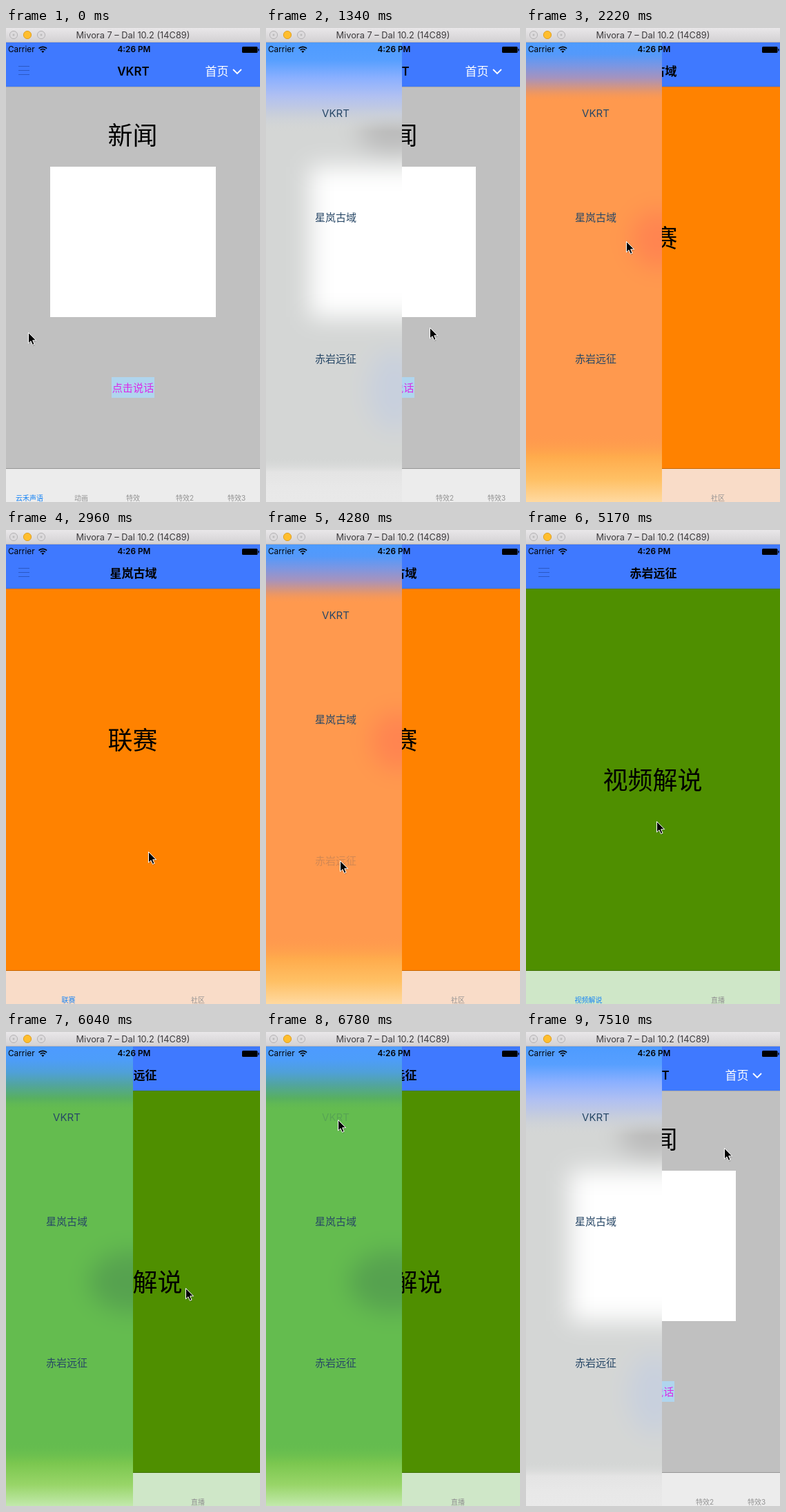
These frames come from a looping animation (368 px wide and 687 px high, 8 s). An HTML page:

```html
<!DOCTYPE html>
<html lang="zh-CN">
<head>
<meta charset="utf-8">
<title>Drawer menu</title>
<style>
html, body { margin: 0; width: 100%; height: 100%; overflow: hidden; }
svg { display: block; width: 100%; height: 100%; }
text { font-family: Inter, "Noto Sans CJK SC", "Noto Sans CJK", sans-serif; white-space: pre; }
</style>
</head>
<body>
<svg id="stage" viewBox="0 0 368 687" xmlns="http://www.w3.org/2000/svg"></svg>
<script>
const LOOP = 8000, STEP = 147.2, LAST = 51, OPEN = 197;
const NAV = '#3f79ff', TINT = '#1583f5', SKY = '#4d9bff';

const games = ['VKRT', '星岚古域', '赤岩远征'];
const itemY = [129, 280, 485];

// sky and foot are the colours of the frosted panel's fades, top to bottom
const scenes = [
  {
    bg: '#c0c0c0', bar: '#ececec', head: '新闻', headY: 169,
    tabs: ['云禾声语', '动画', '特效', '特效2', '特效3'], tabX: [34, 109, 184, 259, 334],
    glass: '#d4d6d5', shade: '#bababa', spot: [184, 152, 50, 28],
    sky: [SKY, '#579fff', '#8bb0ff', '#b0c0f2', '#c8cedb'], skyEnd: 150,
    foot: ['#e4e4e4', '#e8e8e8', '#e9e9e9'], footTop: 622
  },
  {
    bg: '#ff8200', bar: '#f9dcc8', head: '联赛', headY: 318,
    tabs: ['联赛', '社区'], tabX: [90.5, 278],
    glass: '#ff994e', shade: '#ff8450', spot: [192, 306, 40, 42],
    sky: [SKY, '#5499fa', '#7c96e2', '#a693bd', '#e09672'], skyEnd: 107,
    foot: ['#ffab4c', '#ffc064', '#ffd9a0'], footTop: 588
  },
  {
    bg: '#4f8f00', bar: '#cfe7c8', head: '视频解说', headY: 376,
    tabs: ['视频解说', '直播'], tabX: [90.5, 278],
    glass: '#64bc4f', shade: '#56a24f', spot: [184, 362, 64, 44],
    sky: [SKY, '#4d9dfa', '#4fa0d8', '#52a59c', '#58b060'], skyEnd: 115,
    foot: ['#7bc74f', '#98d568', '#c2e9ac'], footTop: 594
  }
];

// [step, x, y]
const pointerKeys = [
  [0, 32, 441], [2, 12, 437], [3, 14, 436], [8, 236, 434], [9, 237, 434],
  [12, 110, 281], [14, 104, 276], [17, 262, 405], [18, 258, 440], [20, 206, 466],
  [22, 14, 458], [23, 16, 455], [26, 250, 436], [28.5, 107, 479], [30, 107, 479],
  [33, 264, 440], [35, 189, 422], [37, 14, 402], [41, 260, 371],
  [45, 104, 128], [48, 104, 126], [51, 287, 168]
];
// [step, width]
const drawerKeys = [
  [0, 0], [3, 0], [8, OPEN], [17, OPEN], [19.5, 0], [23, 0], [27, OPEN],
  [32, OPEN], [34.5, 0], [37, 0], [41, 184], [42, OPEN], [LAST, OPEN]
];
// [first step, scene]
const sceneKeys = [[0, 0], [14, 1], [30, 2], [47, 0]];
// step at which a menu item is pressed: item index
const pressed = { 13: 1, 29: 2, 46: 0 };

const rect = (x, y, w, h, fill, more = '') =>
  `<rect x="${x}" y="${y}" width="${w}" height="${h}" fill="${fill}" ${more}/>`;
const label = (s, x, y, size, fill = '#000', more = '') =>
  `<text x="${x}" y="${y}" font-size="${size}" fill="${fill}" ${more}>${s}</text>`;
const mid = (s, x, y, size, fill, more = '') =>
  label(s, x, y, size, fill, `text-anchor="middle" ${more}`);
const stroke = (d, color, width, more = '') =>
  `<path d="${d}" fill="none" stroke="${color}" stroke-width="${width}" ${more}/>`;
const hairline = (y, alpha) => rect(0, y, 368, 1, '#000', `opacity="${alpha}"`);

// Vertical gradient of evenly spaced colours; `clear` lists a fully transparent one.
const fade = (id, colors, clear) =>
  `<linearGradient id="${id}" x2="0" y2="1">${colors.map((c, k) =>
    `<stop offset="${k / (colors.length - 1)}" stop-color="${c}" stop-opacity="${c === clear ? 0 : 1}"/>`
  ).join('')}</linearGradient>`;

const newsExtras = () =>
  rect(64, 201, 240, 218, '#fff') +
  rect(153, 506, 62, 30, '#b0d5ee') +
  mid('点击说话', 184, 526.5, 15.2, '#d92be8') +
  label('首页', 288.5, 69, 17, '#fff') +
  stroke('M329 60l6 6 6-6', '#fff', 1.8);

const page = (s, i) => `<g class="page">
  ${rect(0, 21, 368, 64, NAV)}
  ${rect(0, 85, 368, 554, s.bg)}
  ${hairline(85, 0.12)}
  ${hairline(638, 0.22)}
  ${rect(0, 639, 368, 48, s.bar)}
  ${stroke('M18 55.5h16M18 61.5h16M18 67.5h16', '#2b58c4', 1)}
  ${mid(games[i], 184.5, 69, 17, '#000', 'font-weight="600"')}
  ${mid(s.head, 183.5, s.headY, 36)}
  ${s.tabs.map((t, k) => mid(t, s.tabX[k], 684.5, 10, k ? '#929292' : TINT)).join('')}
  ${i ? '' : newsExtras()}
</g>`;

const glass = (s, i) => {
  const [cx, cy, rx, ry] = s.spot;
  return `<g class="glass">
    <g filter="url(#soft)">
      ${rect(-80, -60, 420, 830, s.glass)}
      <ellipse cx="${cx}" cy="${cy}" rx="${rx}" ry="${ry}" fill="${s.shade}"/>
      ${i ? '' : rect(64, 201, 240, 218, '#fff') +
        '<ellipse cx="186" cy="525" rx="38" ry="58" fill="#c8d0dd"/>'}
    </g>
    ${rect(0, 21, OPEN, s.skyEnd - 21, `url(#sky${i})`)}
    ${rect(0, s.footTop, OPEN, 687 - s.footTop, `url(#foot${i})`)}
  </g>`;
};

const lamp = (x, fill, edge) =>
  `<circle cx="${x}" cy="10" r="5.6" fill="${fill}" stroke="${edge}"/>`;

const windowBar = () =>
  rect(0, 0, 368, 21, 'url(#metal)') + rect(0, 20, 368, 1, '#b9b5b9') +
  lamp(11, '#dcdadc', '#b5b3b5') + lamp(31, '#ffbe2e', '#dfa023') + lamp(51, '#dcdadc', '#b5b3b5') +
  `<circle cx="11" cy="10" r="1.5" fill="#bbb"/><circle cx="51" cy="10" r="1.5" fill="#bbb"/>` +
  mid('Mivora 7 – Dal 10.2 (14C89)', 184, 15, 12.8, '#3c3a3c');

const statusBar = () =>
  label('Carrier', 3, 35.3, 11.8) +
  stroke('M47.5 29.7a8.3 8.3 0 0 1 11.6 0M49.7 32a5.2 5.2 0 0 1 7.2 0', '#000', 1.7) +
  '<path d="M53.3 36l-2-2.2a3 3 0 0 1 4 0z"/>' +
  mid('4:26 PM', 185.5, 35.3, 11.8, '#000', 'font-weight="600"') +
  rect(342, 27, 22.5, 9, '#000', 'rx="1.5"') + rect(365.3, 30, 1.3, 3.4, '#000');

const stage = document.getElementById('stage');
stage.innerHTML = `
<defs>
  ${fade('metal', ['#e9e7e9', '#d2d0d2'])}
  ${scenes.map((s, i) =>
    fade('sky' + i, [...s.sky, s.glass], s.glass) +
    fade('foot' + i, [s.glass, ...s.foot], s.glass)).join('')}
  <filter id="soft" filterUnits="userSpaceOnUse" x="-80" y="-60" width="420" height="830"
    color-interpolation-filters="sRGB"><feGaussianBlur stdDeviation="17"/></filter>
  <clipPath id="edge"><rect id="cut" x="0" y="21" width="0" height="666"/></clipPath>
</defs>
${scenes.map(page).join('')}
<g id="drawer" clip-path="url(#edge)">
  ${scenes.map(glass).join('')}
  <g id="menu">${games.map((g, i) => mid(g, 101, itemY[i], 15, '#274766', 'class="item"')).join('')}</g>
</g>
${windowBar()}
${statusBar()}
<g id="pointer">
  <path d="M1 2v15l3.4-3 2.5 5.6 2.4-1-2.4-5.4h4.8z" fill="#000" opacity=".18"/>
  <path d="M0 0v15.5l3.5-3.2 2.5 5.6 2.6-1.1-2.4-5.5h4.9z" stroke="#fff" stroke-width="1"/>
</g>`;

const byId = id => document.getElementById(id);
const all = name => [...stage.querySelectorAll('.' + name)];
const pages = all('page'), glasses = all('glass'), items = all('item');
const cut = byId('cut'), drawer = byId('drawer'), menu = byId('menu'), pointer = byId('pointer');

function sample(keys, n) {
  let i = 0;
  while (i < keys.length - 2 && keys[i + 1][0] <= n) i++;
  const a = keys[i], b = keys[i + 1];
  const u = Math.min(1, (n - a[0]) / (b[0] - a[0]));
  const e = u * u * (3 - 2 * u);
  return a.slice(1).map((v, k) => v + (b[k + 1] - v) * e);
}

const showOnly = (list, pick) =>
  list.forEach((el, i) => { el.style.display = i === pick ? '' : 'none'; });

// The picture advances in even steps and holds between them.
function render(ms) {
  const n = Math.min(LAST, Math.floor((ms % LOOP) / STEP));
  const scene = sceneKeys.filter(k => k[0] <= n).pop()[1];
  const w = Math.round(sample(drawerKeys, n)[0]);
  const [x, y] = sample(pointerKeys, n);

  showOnly(pages, scene);
  showOnly(glasses, scene);
  drawer.style.display = w > 0 ? '' : 'none';
  cut.setAttribute('width', w);
  menu.setAttribute('transform', `translate(${w - OPEN} 0)`);
  items.forEach((el, i) => el.setAttribute('opacity', pressed[n] === i ? 0.2 : 1));
  pointer.setAttribute('transform', `translate(${Math.round(x) + 0.5} ${Math.round(y) + 0.5})`);
}

const start = performance.now();
function tick() {
  render(performance.now() - start);
  requestAnimationFrame(tick);
}
tick();
</script>
</body>
</html>
```
